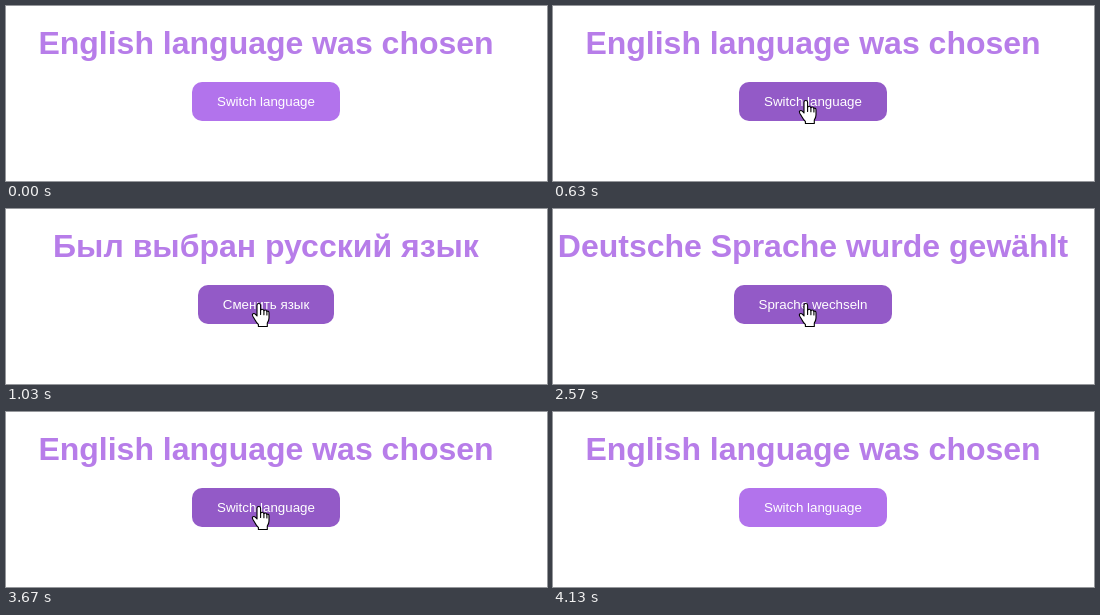
Write an HTML page that moves like this. It is 541 px wide and 175 px high and loops after 5.63 s.

```html
<!DOCTYPE html>
<html lang="en">
<head>
<meta charset="utf-8">
<title>Language switch</title>
<style>
  html, body { margin: 0; width: 100%; height: 100%; overflow: hidden; background: #fff; }
  #page { position: absolute; left: 0; top: 0; width: 520px; height: 175px;
    font-family: Arial, "Liberation Sans", sans-serif; text-align: center; }
  h1 { position: absolute; left: 0; top: 19px; width: 520px; margin: 0;
    font-size: 32px; line-height: 36px; font-weight: bold; color: #b77de9; white-space: nowrap; }
  #row { position: absolute; left: 0; top: 76px; width: 520px; height: 39px; }
  #button { display: inline-block; vertical-align: top; box-sizing: border-box; height: 39px;
    padding: 12px 25px; border-radius: 10px; font-size: 13.3333px; line-height: 15px;
    color: #fff; white-space: nowrap; }
  svg { position: absolute; left: 0; top: 0; }
</style>
</head>
<body>
<div id="page">
  <h1 id="title"></h1>
  <div id="row"><div id="button"></div></div>
</div>
<svg width="541" height="175" viewBox="0 0 541 175">
  <g id="cursor" fill="#fff" stroke="#000" stroke-width="1.1" stroke-linejoin="round" stroke-linecap="round">
    <g id="hand">
      <path d="M-2 13V2.2Q-2 .5-.2 .5T1.6 2.2V7.2Q2 6.2 3.2 6.2T4.9 7.8Q5.2 7 6.3 7T7.9 8.5Q8.2 8 9 8.1Q10 8.3 10 9.7V15Q10 17.5 8.3 20V23.5H-.6V21.5Q-2.4 20-3.8 17.3L-6.2 13.2Q-7.2 11.4-6 10.7Q-4.7 10-3.2 11.6Z"/>
      <path d="M1.6 7V11.5M4.9 8V11.8M7.9 8.8V12" fill="none"/>
    </g>
    <path id="arrow" d="M.5 .8V17L4.3 13.4L6.8 19L9.2 18L6.8 12.5H12Z"/>
  </g>
</svg>
<script>
const LOOP = 5630;
const ENTER = 170, REST = 630, LEAVE = 3830, GONE = 3900;
const LIGHT = [178, 115, 236], DARK = [147, 90, 199];
const english = ["English language was chosen", "Switch language"];
const states = [
  [0, english],
  [1030, ["Был выбран русский язык", "Сменить язык"]],
  [1800, ["Було обрано українську мову", "Змінити мову"]],
  [2570, ["Deutsche Sprache wurde gewählt", "Sprache wechseln"]],
  [3670, english]
];

const [title, button, cursor, hand, arrow] =
  ["title", "button", "cursor", "hand", "arrow"].map(id => document.getElementById(id));
const mix = (a, b, k) => a + (b - a) * k;
const ramp = (t, a, b) => Math.min(1, Math.max(0, (t - a) / (b - a)));
const smooth = k => k * k * (3 - 2 * k);
const easeOut = k => 1 - (1 - k) ** 2;
const show = (el, on) => el.setAttribute("visibility", on ? "visible" : "hidden");
const setText = (el, text) => { if (el.textContent !== text) el.textContent = text; };

// The pointer rises past the label, then settles on it.
function pointer(t) {
  if (t >= LEAVE) return [254, 105];
  const step = (REST - ENTER) / 13;
  const s = ENTER + Math.floor((t - ENTER) / step + 1e-6) * step;
  const up = easeOut(ramp(s, ENTER, 440));
  const back = smooth(ramp(s, 440, REST));
  return [mix(mix(266, 256, up), 253, back), mix(mix(163, 78, up), 94, back)];
}

function draw(t) {
  const [heading, label] = states.filter(s => s[0] <= t).pop()[1];
  setText(title, heading);
  setText(button, label);

  const hover = smooth(ramp(t, 270, 600)) * (1 - easeOut(ramp(t, 3850, 4130)));
  const rgb = LIGHT.map((c, i) => Math.round(mix(c, DARK[i], hover)));
  button.style.backgroundColor = `rgb(${rgb})`;

  const [x, y] = pointer(t);
  const visible = t >= ENTER && t < GONE;
  const over = y < 115;
  cursor.setAttribute("transform", `translate(${Math.round(x)} ${Math.round(y)})`);
  show(hand, visible && over);
  show(arrow, visible && !over);
}

const start = performance.now();
function tick(now) {
  draw(Math.max(0, now - start) % LOOP);
  requestAnimationFrame(tick);
}
draw(0);
requestAnimationFrame(tick);
</script>
</body>
</html>
```
